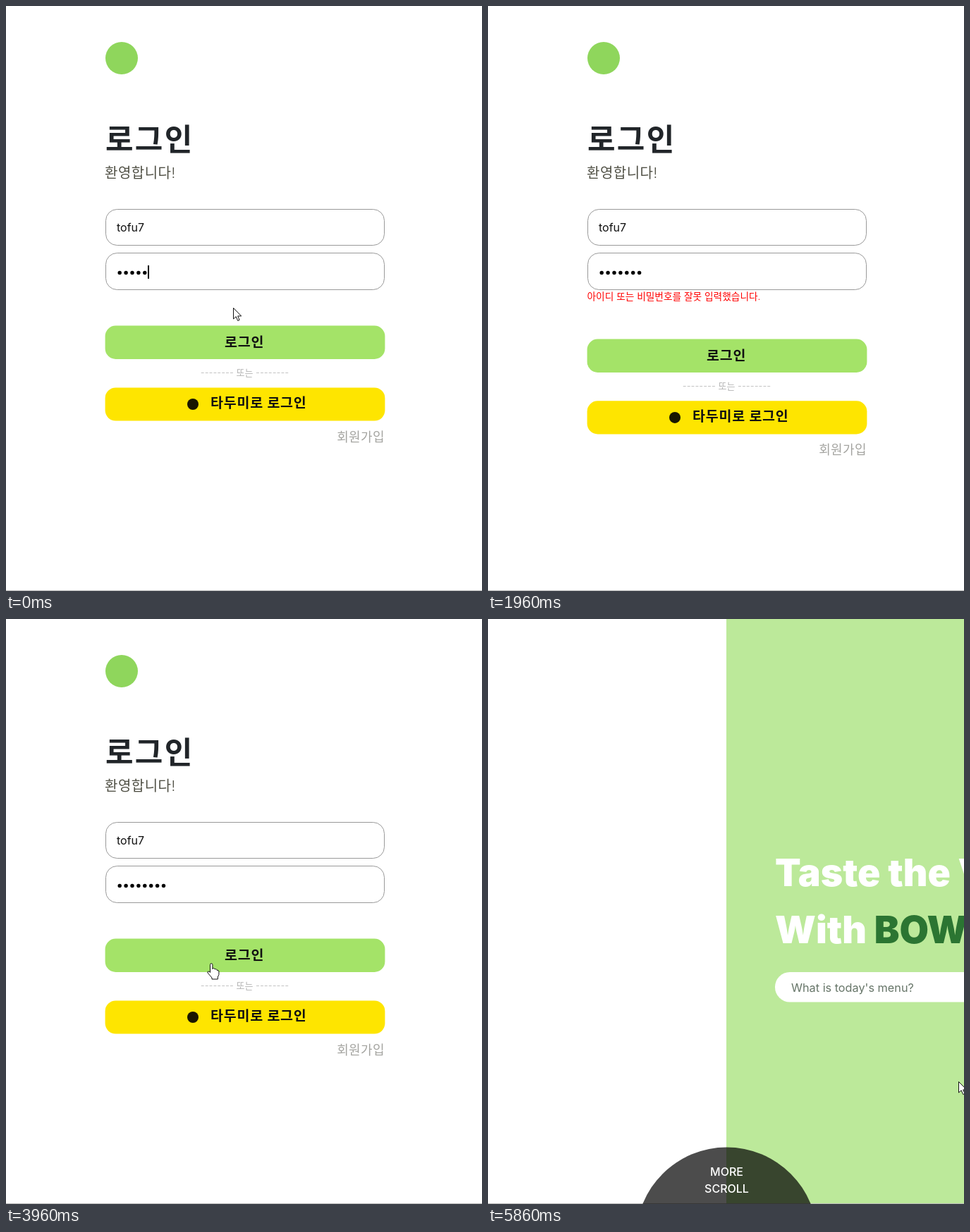
Recreate the animation shown at these times as an HTML page. Size 675 by 830 pixels, loop 5930 ms.

```html
<!DOCTYPE html>
<html lang="ko">
<head>
<meta charset="utf-8">
<title>로그인</title>
<style>
html, body { margin: 0; width: 100%; height: 100%; overflow: hidden; background: #fff; }
svg { display: block; font-family: Inter, "Noto Sans CJK KR", "Noto Sans CJK", sans-serif; }
text { white-space: pre; }
.field { fill: #fff; stroke: #999; }
.strong { font-size: 19.5px; font-weight: 700; letter-spacing: .8px; fill: #111; }
.hero { font-size: 53.5px; font-weight: 900; fill: #fff; }
#cursor path { fill: #fff; stroke: #111; stroke-linejoin: round; }
</style>
</head>
<body>
<svg width="675" height="830" viewBox="0 0 675 830">
  <rect y="829" width="675" height="1" fill="#b8b8b8"/>
  <g id="login">
    <circle cx="164" cy="74" r="23" fill="#8fd65c"/>
    <text x="141" y="204.5" font-size="43" font-weight="700" letter-spacing="2.3" fill="#212529">로그인</text>
    <text x="140" y="244" font-size="20" font-weight="300" letter-spacing=".5" fill="#505045">환영합니다!</text>
    <rect class="field" x="141.5" y="288.5" width="395" height="51" rx="16"/>
    <rect class="field" x="141.5" y="350.5" width="395" height="52" rx="16"/>
    <text x="157" y="319.5" font-size="16" fill="#111">tofu7</text>
    <g id="dots"></g>
    <rect id="caret" y="368" width="2" height="19"/>
    <text id="error" x="140.5" y="416.5" font-size="13.7" font-weight="300" fill="#f00">아이디 또는 비밀번호를 잘못 입력했습니다.</text>
    <g id="actions">
      <rect x="140.6" y="453.6" width="396.8" height="47.4" rx="15" fill="#a4e368"/>
      <text class="strong" x="310" y="484">로그인</text>
      <text x="338.5" y="525" font-size="13" font-weight="300" text-anchor="middle" fill="#b4b4b4">-------- 또는 --------</text>
      <rect x="140.6" y="541.4" width="396.8" height="47.2" rx="15" fill="#fee500"/>
      <circle id="icon" cx="265" cy="565" r="8" fill="#191600"/>
      <text id="social" class="strong" y="570">타두미로 로그인</text>
      <text x="537" y="617.5" font-size="18" font-weight="300" letter-spacing=".4" text-anchor="end" fill="#a4a4a0">회원가입</text>
    </g>
  </g>
  <g id="home">
    <rect x="338" width="337" height="829" fill="#bce99a"/>
    <text class="hero" x="407" y="379">Taste the V</text>
    <text class="hero" x="407" y="460">With <tspan fill="#2b7532">BOWL TUK</tspan></text>
    <rect x="407" y="501" width="400" height="42.5" rx="21" fill="#fff"/>
    <text x="430" y="528.5" font-size="16.25" fill="#667568">What is today's menu?</text>
    <circle cx="338.5" cy="878" r="128.5" fill-opacity=".7"/>
    <g font-size="16" font-weight="500" fill="#fff" text-anchor="middle">
      <text x="338.5" y="790">MORE</text>
      <text x="338.5" y="813.5">SCROLL</text>
    </g>
  </g>
  <g id="cursor">
    <path id="arrow" d="M0 0V15.5L3.7 12.2L6.2 18L8.6 17L6.2 11.4H11.2Z"/>
    <path id="hand" d="M-2 12V1a1.7 1.7 0 0 1 3.4 0V7q0-1.3 1.6-1t1.6 1.4q1.6-.6 2.4.2t.6 1.2q2.6-.4 2.8 1.8V15l-1.6 3.5V21.5H.5V19.5L-5.5 12.5q-.6-2 1-2t2.5 1.5Z"/>
    <path id="beam" d="M-3 -8H3M0 -8V8M-3 8H3"/>
  </g>
</svg>
<script>
const LOOP = 5930;
const $ = id => document.getElementById(id);
const show = (id, on) => $(id).style.display = on ? "" : "none";
const within = (v, a, b) => v >= a && v < b;

// Pointer moves: first change, last change, steps, bend point, end point
const moves = [
  [70, 400, 5, 320, 480, 313, 459],
  [540, 540, 1, 320, 454, 320, 454],
  [870, 940, 2, 310, 490, 113, 337],
  [2900, 2900, 1, 266, 376, 266, 376],
  [3440, 3960, 9, 320, 595, 291, 489],
  [4500, 4850, 6, 450, 568, 572, 549],
  [5260, 5260, 1, 573, 549, 573, 549],
  [5650, 5650, 1, 663, 657, 663, 657],
  [5860, 5860, 1, 667, 656, 667, 656]
];

function pointer(t) {
  let x = 322, y = 428;
  for (const [from, to, steps, bx, by, ex, ey] of moves) {
    if (t < from) break;
    const gap = (to - from) / (steps - 1) || 1;
    const u = Math.min(steps, Math.floor((t - from) / gap + 1.001)) / steps;
    const bezier = (a, b, c) => Math.round((1 - u) ** 2 * a + 2 * u * (1 - u) * b + u * u * c);
    x = bezier(x, bx, ex);
    y = bezier(y, by, ey);
  }
  return [x, y];
}

function shapeAt(x, y) {
  if (!within(x, 141, 537)) return "arrow";
  if (within(y, 454, 501) || within(y, 542, 588)) return "hand";
  if (within(y, 288, 340) || within(y, 350, 403)) return "beam";
  return "arrow";
}

const dots = Array.from({ length: 8 }, (_, i) => {
  const dot = document.createElementNS("http://www.w3.org/2000/svg", "circle");
  dot.setAttribute("cx", 161.2 + 8.9 * i);
  dot.setAttribute("cy", 378.5);
  dot.setAttribute("r", 2.7);
  return $("dots").appendChild(dot);
});

function draw(t) {
  const home = t >= 5860;
  show("login", !home);
  show("home", home);

  const typed = t < 70 ? 5 : t < 140 ? 6 : t < 2900 ? 7 : 8;
  dots.forEach((dot, i) => dot.style.display = i < typed ? "" : "none");
  $("caret").setAttribute("x", Math.round(156.5 + 8.9 * typed));
  show("caret", t < 330 || within(t, 3300, 3830));

  const failed = within(t, 1960, 2900);
  show("error", failed);
  $("actions").setAttribute("transform", `translate(0 ${failed ? 18.9 : 0})`);

  const iconless = within(t, 2900, 2970);
  show("icon", !iconless);
  $("social").setAttribute("x", iconless ? 269 : 290);

  const [x, y] = pointer(t);
  const shape = home ? "arrow" : shapeAt(x, y);
  for (const id of ["arrow", "hand", "beam"]) show(id, id === shape);
  show("cursor", !within(t, 1010, 2900));
  $("cursor").setAttribute("transform", `translate(${x + .5} ${y + .5})`);
}

const start = performance.now();
function tick() {
  draw((performance.now() - start) % LOOP);
  requestAnimationFrame(tick);
}
tick();
</script>
</body>
</html>
```
